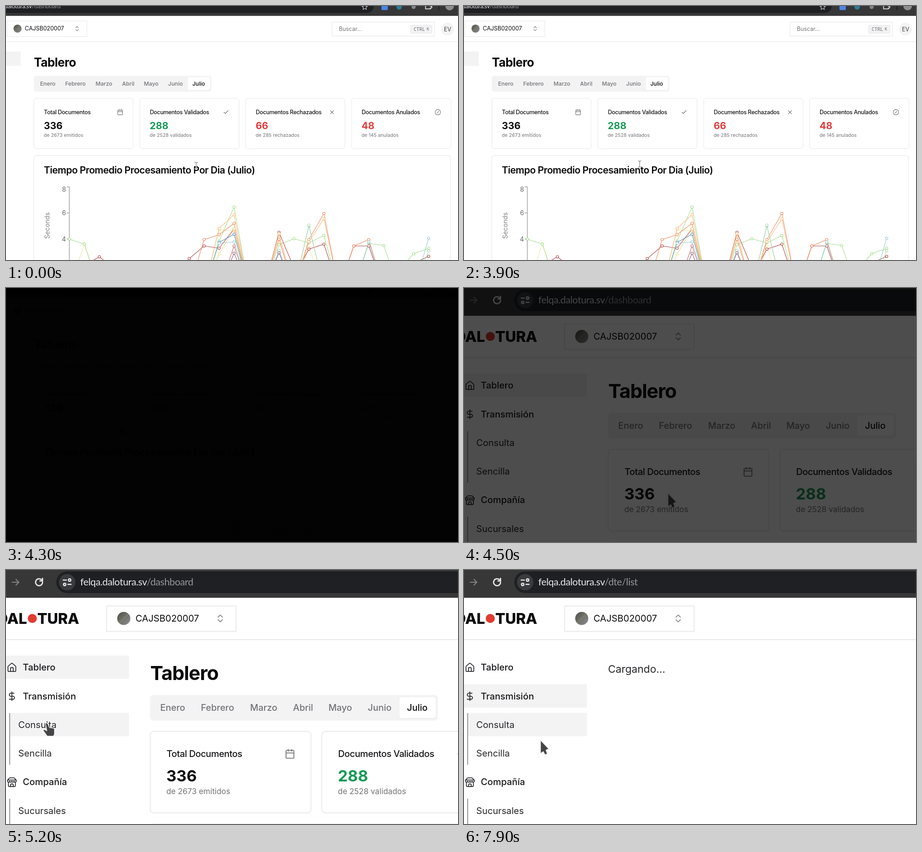
These frames come from a looping animation (998x561 px, 8 s). An HTML page:

```html
<!DOCTYPE html>
<html lang="es">
<head>
<meta charset="utf-8">
<title>Tablero</title>
<style>
  html, body { margin: 0; width: 100%; height: 100%; overflow: hidden; background: #fff; }
  svg { display: block; width: 100%; height: 100%; font-family: Inter, sans-serif; }
  text { white-space: pre; }
  .ico { fill: none; stroke-linecap: round; stroke-linejoin: round; }
</style>
</head>
<body>
<svg id="stage" viewBox="0 0 998 561"></svg>
<script>
const LOOP = 8000, STEP = 100;
const CUT = 4400, NAV = 6700;
const FADE = 333;
const WIDE = 'translate(-135 -16.1) scale(.6173)';
const UNWIDE = 'scale(1.62) translate(135 16.1)';
const INK = '#0b0b0d', MUTED = '#737378', LINE = '#e4e4e7', SOFT = '#f3f3f4';

const text = (x, y, s, size, fill = INK, weight = 400, more = '') =>
  `<text x="${x}" y="${y}" font-size="${size}" fill="${fill}" font-weight="${weight}" ${more}>${s}</text>`;
const rect = (x, y, w, h, fill, more = '') =>
  `<rect x="${x}" y="${y}" width="${w}" height="${h}" fill="${fill}" ${more}/>`;
const circle = (x, y, r, fill, more = '') =>
  `<circle cx="${x}" cy="${y}" r="${r}" fill="${fill}" ${more}/>`;
const group = (body, attrs = '') => `<g ${attrs}>${body}</g>`;
const MID = 'text-anchor="middle"';

// 24-unit line icons
const ICONS = {
  house: 'M15 21v-8a1 1 0 0 0-1-1h-4a1 1 0 0 0-1 1v8M3 10a2 2 0 0 1 .7-1.5l7-6a2 2 0 0 1 2.6 0l7 6A2 2 0 0 1 21 10v9a2 2 0 0 1-2 2H5a2 2 0 0 1-2-2z',
  dollar: 'M12 2v20M17 5H9.5a3.5 3.5 0 0 0 0 7h5a3.5 3.5 0 0 1 0 7H6',
  store: 'M2 7l4.4-4.4A2 2 0 0 1 7.8 2h8.4a2 2 0 0 1 1.4.6L22 7zM4 12v8a2 2 0 0 0 2 2h12a2 2 0 0 0 2-2v-8M15 22v-4a2 2 0 0 0-2-2h-2a2 2 0 0 0-2 2v4M2 7v2.5a2.5 2.5 0 0 0 5 0a2.5 2.5 0 0 0 5 0a2.5 2.5 0 0 0 5 0a2.5 2.5 0 0 0 5 0V7',
  calendar: 'M8 2v4M16 2v4M3 10h18M5 4h14a2 2 0 0 1 2 2v14a2 2 0 0 1-2 2H5a2 2 0 0 1-2-2V6a2 2 0 0 1 2-2z',
  check: 'M20 6L9 17l-5-5',
  cross: 'M18 6L6 18M6 6l12 12',
  slash: 'M9 15l6-6M2 12a10 10 0 0 1 20 0a10 10 0 0 1-20 0',
  updown: 'M7 15l5 5 5-5M7 9l5-5 5 5',
  forward: 'M4 12h16M13 5l7 7-7 7',
  reload: 'M20 12a8 8 0 1 1-2.5-5.8M20 3v6h-6',
  tune: 'M3 7h7M14 17h7M15 7a2.7 2.7 0 0 1 5.4 0a2.7 2.7 0 0 1-5.4 0M3.6 17a2.7 2.7 0 0 1 5.4 0a2.7 2.7 0 0 1-5.4 0',
  star: 'M12 2l3 7 7.5.6-5.7 5 1.8 7.4-6.6-4-6.6 4 1.8-7.4-5.7-5L9 9z',
  puzzle: 'M4 8h5a3 3 0 1 1 6 0h4v5a3 3 0 1 1 0 5v3H4z'
};
const icon = (name, x, y, size, color, width = 2) =>
  `<path class="ico" d="${ICONS[name]}" stroke="${color}" stroke-width="${width}"
    transform="translate(${x} ${y}) scale(${size / 24}) translate(-12 -12)"/>`;

function browserBar() {
  const lato = 'font-family="Lato, sans-serif" letter-spacing="-.43"';
  const url = 'felqa.dalotura.sv<tspan id="path" fill="#94979b"></tspan>';
  const right = icon('star', 792, 2, 14, '#c8c9cc')
    + rect(829, -5, 14, 14, '#4a86e8', 'rx="2"')
    + circle(868, 2, 6, '#2b7f9a')
    + circle(900, 2, 4.5, '#85878a')
    + icon('puzzle', 932, 0, 17, '#e8e8e8', 2.4)
    + rect(955, -6, 1.5, 15, '#1c1c1e')
    + circle(979.5, 0, 9.5, '#8f8f8f');
  return rect(-20, 0, 1900, 61.4, '#373738')
    + rect(111, 3, 1423, 48, '#1f2023', 'rx="24"')
    + icon('forward', 21, 27, 22, '#85868a', 2.3)
    + icon('reload', 73, 27, 23, '#e6e6e6', 2.9)
    + circle(135, 27, 18, '#3a3b3e')
    + icon('tune', 135, 27, 23, '#e6e6e6', 2.7)
    + text(164, 34, url, 21.5, '#e8e9ec', 400, lato)
    + group(right, `transform="${UNWIDE}"`);
}

function header() {
  const right = rect(720, 35.5, 226, 31, '#fff', `stroke="${LINE}"`)
    + text(735, 55, 'Buscar...', 12.4, MUTED)
    + rect(893.5, 42.5, 47, 17.5, SOFT, `rx="2" stroke="${LINE}"`)
    + group(text(900, 54.5, 'CTRL', 10.5, MUTED) + text(929, 54, 'K', 8.9, MUTED),
      'font-family="DejaVu Sans Mono, monospace"')
    + circle(975, 51, 14, SOFT)
    + text(975, 55.5, 'EV', 12.4, '#3f3f46', 400, MID);
  const logo = group(text(46, 119, 'DAL', 33, INK, 800, 'text-anchor="end"')
    + text(69, 119, 'TURA', 33, INK, 800), 'letter-spacing="-.3"') + circle(58, 107, 10, '#e23b30');
  return logo + rect(-20, 153, 1900, 1.6, LINE)
    + rect(222, 79.5, 286, 56, '#fff', `stroke="${LINE}" stroke-width="1.5"`)
    + circle(260, 107, 14.5, 'url(#ball)')
    + text(286, 114.3, 'CAJSB020007', 20.2)
    + icon('updown', 473, 107, 23, '#85858a')
    + group(right, `transform="${UNWIDE}"`);
}

const ROW = 63.3;
function sidebar() {
  const rows = [['Tablero', 'house'], ['Transmisión', 'dollar'], ['Consulta'], ['Sencilla'],
    ['Compañía', 'store'], ['Sucursales']];
  const mark = (id, i, x) => rect(x, 189 + ROW * i, 271.5 - x, 51.5, SOFT, `id="${id}"`);
  return mark('onHome', 0, -20) + mark('onSend', 1, -20) + mark('onQuery', 2, 9)
    + rect(7.5, 316, 1.5, 114, '#77777c') + rect(7.5, 505, 1.5, 114, '#77777c')
    + rows.map(([label, ico], i) => {
      const y = 215 + ROW * i;
      return ico ? icon(ico, 13, y + .5, 23, '#2a2a2e', 1.9) + text(37, y + 7.2, label, 20.2, '#18181b', 500)
        : text(27, y + 7.2, label, 20.2, '#27272a');
    }).join('');
}

function tabs() {
  const months = [['Enero', 368], ['Febrero', 467], ['Marzo', 569], ['Abril', 656],
    ['Mayo', 738], ['Junio', 825], ['Julio', 908]];
  return rect(318, 276, 635.5, 56.5, SOFT, 'rx="8"')
    + rect(869, 282, 79.5, 46, '#e6e6e8', 'rx="5"')
    + rect(869, 281, 79.5, 46, '#fff', 'rx="5"')
    + months.map(([m, x], i) => text(x, 311, m, 19.9, i === 6 ? INK : MUTED, 500, MID)).join('');
}

function cards() {
  const list = [
    ['Total Documentos', 'calendar', 336, 'de 2673 emitidos', INK],
    ['Documentos Validados', 'check', 288, 'de 2528 validados', '#169a55'],
    ['Documentos Rechazados', 'cross', 66, 'de 285 rechazados', '#e53a3a'],
    ['Documentos Anulados', 'slash', 48, 'de 145 anulados', '#e53a3a']
  ];
  return list.map(([title, ico, n, note, color], i) => {
    const x = 318.5 + 378.8 * i;
    return rect(x, 356.5, 355, 180, '#fff', `rx="8" stroke="${LINE}" stroke-width="1.5"`)
      + text(x + 36, 413, title, 20.2, '#18181b', 500, 'letter-spacing="-.5"')
      + icon(ico, x + 308.5, 406, 23, MUTED)
      + text(x + 35.5, 467, n, 34.6, color, 700)
      + text(x + 35.5, 495, note, 17.3, MUTED);
  }).join('');
}

// Each run: first day, then heights; it rises from and falls back below the fold.
const SERIES = [
  ['#f7e59a', '2 525', '11 494 497', '15 505', '17 532'],
  ['#a3dd88', '1 515 526', '11 519 444', '15 527 514 523 507', '21 524 529', '23 585 547 535'],
  ['#b2403f', '2 573 554 580', '9 558 530 535 492', '15 500 578', '16 598 537 526', '20 530 530', '24 568 553'],
  ['#ee8a5c', '10 516 505 480', '15 515', '17 516 458', '20 530 516'],
  ['#f9b979', '11 491 461', '15 503', '17 521 470'],
  ['#efdc80', '11 548 492'],
  ['#4f8fc4', '11 522 504'],
  ['#93c9d0', '11 524 521', '15 540', '17 486', '21 521', '25 513'],
  ['#b5dba8', '17 484', '25 541'],
  ['#cc6468', '12 530'],
  ['#8a5a6c', '12 546', '15 545']
];
const LAST_DAY = 25;
const dayX = d => 140 + 33.05 * (d - 1);

function plot([color, ...runs]) {
  let lines = '', dots = '';
  for (const run of runs) {
    const [first, ...ys] = run.split(' ').map(Number);
    const pts = ys.map((y, i) => [dayX(first + i), y]);
    dots += pts.map(p => circle(...p, 2.7, '#fff')).join('');
    if (first > 1) pts.unshift([dayX(first - 1), 625]);
    if (first + ys.length <= LAST_DAY) pts.push([dayX(first + ys.length), 625]);
    lines += `<polyline fill="none" points="${pts.join(' ')}"/>`;
  }
  return group(lines + dots, `stroke="${color}" stroke-width="1.1"`);
}

function chart() {
  const ticks = [8, 6, 4].map((v, i) => text(132.5, [410, 462, 519.5][i], v, 14.2, '#666', 400, 'text-anchor="end"')
    + rect(134, 399 + 57.5 * i, 6, 1, '#777')).join('');
  return rect(61.2, 330.3, 920.5, 400, '#fff', `rx="5" stroke="${LINE}"`)
    + text(83.5, 370, 'Tiempo Promedio Procesamiento Por Dia (Julio)', 21.3, INK, 600, 'letter-spacing="-.54"')
    + rect(139.3, 399, 1, 200, '#777') + ticks
    + text(0, 0, 'Seconds', 14.2, '#808080', 400, `${MID} transform="translate(96 485) rotate(-90)"`)
    + SERIES.map(plot).join('');
}

const BEAM = 'M-6-11q6 0 6 4q0-4 6-4M0-8V9M-6 12q6 0 6-4q0 4 6 4';
const CURSORS = {
  beam: `<path d="${BEAM}" fill="none" stroke="#fff" stroke-width="3.4"/>
    <path d="${BEAM}" fill="none" stroke="#666" stroke-width="1.7"/>`,
  arrow: '<path d="M0 0V29l6-4 4 7 5-2-3-8 6-3z" fill="#454547" stroke="#e6e6e6" stroke-width="1.5"/>',
  hand: '<path d="M-4 2c2-3 5-1 6 2l3 7 8 1q3 0 3 4v9l-2 5H0l-8-11c-2-3 1-5 3-3l4 2z" fill="#454547" stroke="#f4f4f4" stroke-width="1.5"/>'
};

const stage = document.getElementById('stage');
stage.innerHTML = `<defs><linearGradient id="ball" x1="0" y1="0" x2="1" y2="1">
    <stop offset=".1" stop-color="#555"/><stop offset=".42" stop-color="#6b6c62"/>
    <stop offset=".5" stop-color="#7d8065"/><stop offset=".56" stop-color="#747474"/>
    <stop offset="1" stop-color="#8c8c8c"/></linearGradient></defs>`
  + group(rect(-20, 0, 1900, 960, '#fff') + browserBar() + header() + sidebar()
    + group(text(318.5, 242.7, 'Tablero', 43, INK, 700, 'letter-spacing="-1.05"') + tabs() + cards()
      + group(chart(), `transform="${UNWIDE}"`), 'id="dash"')
    + group(text(318, 226.5, 'Cargando...', 23, '#27272a'), 'id="load"')
    + group(Object.entries(CURSORS).map(([k, d]) => group(d, `id="${k}"`)).join(''), 'id="cursor"'), 'id="page"')
  + rect(0, 0, 998, 561, '#000', 'id="shade"');

const $ = id => document.getElementById(id);
const show = (id, on) => $(id).setAttribute('display', on ? 'inline' : 'none');
const clamp = v => Math.max(0, Math.min(1, v));

// time, x, y in page units
const TRAIL = [[0, 899, 596], [3700, 899, 596], [3900, 847, 591], [4300, 627, 521], [4700, 274, 386],
  [5200, 91, 337], [7000, 91, 337], [7400, 169, 376], [LOOP, 169, 376]];

function pointer(t) {
  const i = TRAIL.findIndex(k => k[0] > t);
  const [t0, x0, y0] = TRAIL[i - 1], [t1, x1, y1] = TRAIL[i];
  const p = (t - t0) / (t1 - t0);
  return [x0 + (x1 - x0) * p, y0 + (y1 - y0) * p];
}

function draw(t) {
  const near = t >= CUT, loaded = t >= NAV;
  const [x, y] = pointer(t);
  const over = near && x < 271 && y > 316 && y < 367;
  const kind = t < 4000 ? 'beam' : over ? 'hand' : 'arrow';
  $('page').setAttribute('transform', near ? '' : WIDE);
  $('path').textContent = loaded ? '/dte/list' : '/dashboard';
  show('dash', !loaded);
  show('load', loaded);
  show('onHome', !loaded);
  show('onSend', loaded);
  show('onQuery', loaded || over);
  for (const k in CURSORS) show(k, k === kind);
  $('cursor').setAttribute('transform', `translate(${x} ${y})`);
  const light = near ? (t - CUT) / FADE : (4304 - t) / FADE;
  $('shade').setAttribute('opacity', 1 - clamp(light));
}

const start = performance.now();
function tick() {
  const t = (performance.now() - start) % LOOP;
  draw(Math.floor(t / STEP) * STEP);
  requestAnimationFrame(tick);
}
tick();
</script>
</body>
</html>
```
